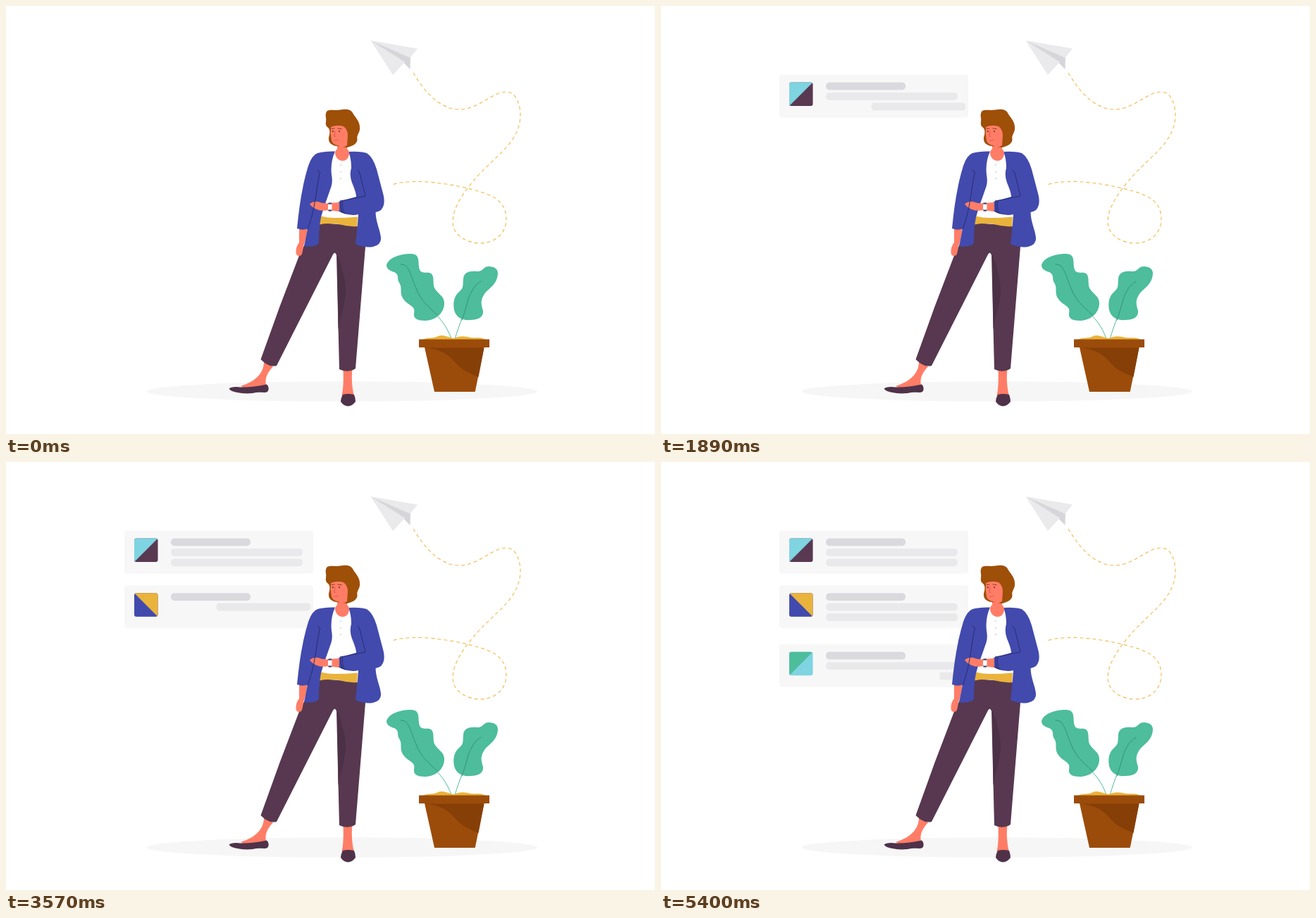
Write an HTML page that moves like this. It is 921x608 px and loops after 6.27 s.

```html
<!DOCTYPE html>
<html lang="en">
<head>
<meta charset="utf-8">
<title>Notification cards</title>
<style>
  html, body { margin: 0; width: 100%; height: 100%; overflow: hidden; background: #fff; }
  svg { display: block; width: 100%; height: 100%; }
  .skin { fill: #ff7d66; }
  .coat { fill: #424aad; }
  .pants { fill: #573850; }
  .hair { fill: #9e4f08; }
  .pot { fill: #9b4c0a; }
  .gold { fill: #eab33b; }
  .leaf { fill: #4dbd9c; }
  .line { fill: none; stroke-width: 1; stroke-linecap: round; stroke-linejoin: round; }
  .seam { stroke: #292d72; }
  .trail { fill: none; stroke: #f0b94a; stroke-width: 1.1; stroke-dasharray: 5 4; }
</style>
</head>
<body>
<svg viewBox="0 0 921 608">
  <ellipse cx="476.5" cy="547.5" rx="277" ry="14.3" fill="#f6f6f6"/>
  <g id="cards"></g>

  <g id="plane">
    <path fill="#d6d6da" d="M517.5 49L574 72L573.5 90L564 80Z"/>
    <path fill="#eaeaec" d="M517.5 49L584 60.5L573.5 73.5ZM517.5 49L549 98L566 79.5Z"/>
  </g>
  <path class="trail" d="M578 95C590 115 612 147 644 147C672 146 690 122 710 122C724 122 730 140 730 156C728 200 687 215 655 259C645 272 634 290 634 306C634 327 655 337 674 337C696 336 710 322 710 302C709 276 690 269 670 263C640 254 580 243 548 254"/>

  <g id="plant">
    <path class="line" stroke="#4dbd9c" d="M585 408C598 432 621 440 632 473M660 412C652 430 643 453 637 473"/>
    <path class="leaf" d="M540 368C543 357 560 352 574 352C587 352 585 361 586 370C587 381 594 378 601 379C608 381 606 390 607 397C609 408 622 410 622 422C622 435 612 446 595 447C584 447 578 444 579 437C582 425 571 427 563 415C558 407 563 400 558 393C554 387 559 382 551 378C544 376 540 373 540 368Z"/>
    <path class="leaf" d="M698 380C698 372 691 370 684 370C676 371 677 378 668 377C658 376 650 378 649 387C648 397 650 400 643 406C636 412 634 421 636 432C639 443 648 447 659 446C670 446 678 442 677 433C674 423 673 418 679 409C686 400 697 396 698 380Z"/>
    <path class="line" stroke="#35937a" d="M560 367C573 366 574 385 585 408C592 422 603 430 612 439M674 391C656 402 656 422 647 446"/>
    <path class="gold" d="M591 474C600 470 606 473 613 469C620 466 628 471 636 472C644 468 652 469 659 471C667 472 674 470 681 474Z"/>
    <path class="pot" d="M586 473.5H686V485H678.5L665.7 548H608L594 485H586Z"/>
    <path fill="#873f08" d="M595 485.5C618 488 629 496 638 507C647 518 659 522 670.5 527L678.5 485.5Z"/>
  </g>

  <g id="person">
    <path class="skin" d="M366 505C366 517 360 526 349 533Q342 537 333 540L345 546L369 540C367 528 371 521 379 512ZM478.5 516H491.5C490 530 491 542 494 554H476.5C479 542 479 530 478.5 516Z"/>
    <path fill="#4f324a" d="M316.5 543.5Q319 541 327 541Q345 543 370 537.5Q373 540 372.5 545Q372 549 367 549Q357 548 350 550Q340 551 331 549.5Q319 548 316.5 543.5ZM478 552Q485 550 494 552Q496 557 496 562Q491 568.5 485.5 568.5Q479 568 475 562Q475 557 478 552Z"/>
    <path class="pants" d="M444 308L498 312L510 342L496 515Q485 522 473 516L469 354Q467 348 464 353L384 511Q373 514 361.5 502Q388 426 417 352Q421 345 425 336Z"/>
    <path fill="#4b3046" d="M470 354Q474 360 477 375Q483 393 482 408Q480 428 474 445L471.5 460Z"/>
    <path fill="#fff" d="M466 207H488L500 303H446L462 235Z"/>
    <path class="gold" d="M446.5 298.5Q457 301 467 301Q483 301 499 299.5L498 313Q486 314 473 310Q458 308 444.5 310.5Z"/>
    <path class="skin" d="M416 315H428Q426 332 422 341Q421 351 419 354Q413 357 411.5 351Q411 342 416 336Z"/>
    <path class="coat" d="M467 206.5Q452 206 442 209Q434 212 429 227C420 256 416 286 413 316Q421 319 428 316.5L423 341.5Q439 343 444 337Q444 315 447 300C451 285 456 273 461 258Q464 250 462 240Q460 222 467 206.5Z"/>
    <path class="coat" d="M486 207Q503 206 512 209Q521 215 526 232L535.5 268Q539 283 532 290Q529 292 524.5 293C525 308 531 318 532 329Q533 339 521 342Q507 344 496 338Q499 311 500 296Q488 299 473 292L472 278L497 271Q497 265 491 251Q487 240 490 230Q490 216 486 207Z"/>
    <path class="skin" d="M470 193H484L484 203Q487 205 487 211Q485 220 477 220Q469 219 467 210Q467 205 470 203Z"/>
    <path class="skin" d="M431 281Q437 276.5 443 278Q450 281 457 280L473 279V292L457 290Q447 292 440 288.5Q433 285 431 281Z"/>
    <path fill="#343672" d="M457.5 279.5H462V291.5H457.5Z"/>
    <rect x="457" y="281.5" width="5.5" height="8" rx="1" fill="#fff"/>
    <path class="line seam" d="M442 233L445.5 235.5C440 260 439 290 428 317M499 233Q502 235 503 241L510 270L475 277M475 276Q474 285 477 294M478 276Q476 285 480 295M473 291L483 295"/>
    <g fill="#d2d2d8">
      <circle cx="475" cy="226" r="1"/><circle cx="475" cy="235.5" r="1"/><circle cx="475" cy="245" r="1"/>
    </g>
    <path class="hair" d="M455 150C458 146 467 149 474 147.5C482 146 488 146 491.5 151C495 158 502 163 502 172C503 180 497 183 498.5 189C499 196 491 199 484 201L466 198.5C457 195 457 189 459 183C460 177 459 174 456 172C452 168 455 164 454 159Q453 153 455 150Z"/>
    <path class="skin" d="M461 172Q469 168 479 171Q485 175 485 184L484 198Q476 203 471 198Q464 197 462 191Q460 182 461 172Z"/>
    <path class="line" stroke="#8a3f20" d="M462 174.5L466 174M471 174L476 174.5"/>
    <path class="line" stroke="#d95c4c" d="M467 178L465.5 185H468M466 191Q469 192 472 190"/>
    <g fill="#733018"><circle cx="464" cy="178" r="1.1"/><circle cx="473" cy="178" r="1.1"/></g>
  </g>
</svg>
<script>
const LOOP = 6270, STEP = 30, CARD_MS = 300, BAR_MS = 210;
const ORIGIN_X = 460; // everything unfolds from behind the person

// fromY: where the card's centre starts; bars: start time of each text bar
const cards = [
  { top: 97.5, fromY: 222.5, start: 900, bars: [1350, 1530, 1740], base: '#583951', tri: '#7fd4e2', flip: false },
  { top: 175.2, fromY: 255.5, start: 2670, bars: [3090, 3420, 3750], base: '#424aad', tri: '#eab33b', flip: true },
  { top: 258.8, fromY: 297.5, start: 4350, bars: [4650, 4980, 5340], base: '#7fd4e2', tri: '#4dbd9c', flip: false }
];
const barStyles = [
  { y: 16.4, width: 113, fill: '#d9d9de' },
  { y: 30.8, width: 187, fill: '#e9e9eb' },
  { y: 45.3, width: 187, fill: '#e9e9eb' }
];

function add(parent, tag, attrs = {}) {
  const node = document.createElementNS('http://www.w3.org/2000/svg', tag);
  for (const key in attrs) node.setAttribute(key, attrs[key]);
  return parent.appendChild(node);
}

function box(parent, x, y, width, height, rx, fill) {
  return add(parent, 'rect', { x, y, width, height, rx, fill });
}

const parts = [];
const layer = document.getElementById('cards');
for (const card of cards) {
  const node = add(layer, 'g');
  box(node, -134, -30.5, 268, 61, 4, '#f7f7f7');
  box(node, -120, -19.5, 33.5, 33.5, 3, card.base);
  add(node, 'path', {
    d: card.flip
      ? 'M-119.2 -18.7L-117 -19.5H-89.5Q-86.5 -19.5 -86.5 -16.5V11L-87.3 13.2Z'
      : 'M-119.2 13.2L-120 11V-16.5Q-120 -19.5 -117 -19.5H-89.5L-87.3 -18.7Z',
    fill: card.tri
  });
  parts.push({ node, start: card.start, ms: CARD_MS, x: 302, y: card.top + 30.5, fromY: card.fromY, minY: 0.5 });

  barStyles.forEach(({ y, width, fill }, i) => {
    const bar = box(layer, -width / 2, -5.4, width, 10.8, 5, fill);
    const cy = card.top + y;
    parts.push({ node: bar, start: card.bars[i], ms: BAR_MS, x: 234 + width / 2, y: cy, fromY: cy, minY: 1 });
  });
}

const mix = (a, b, k) => a + (b - a) * k;

function draw(time) {
  const t = Math.floor(time % LOOP / STEP) * STEP;
  for (const { node, start, ms, x, y, fromY, minY } of parts) {
    const k = Math.min(1, Math.max(0, (t - start) / ms));
    node.setAttribute('visibility', k > 0 ? 'visible' : 'hidden');
    if (k > 0) node.setAttribute('transform',
      `translate(${mix(ORIGIN_X, x, k)} ${mix(fromY, y, k)}) scale(${k} ${mix(minY, 1, k)})`);
  }
}

const begin = performance.now();
function tick() {
  draw(performance.now() - begin);
  requestAnimationFrame(tick);
}
tick();
</script>
</body>
</html>
```
